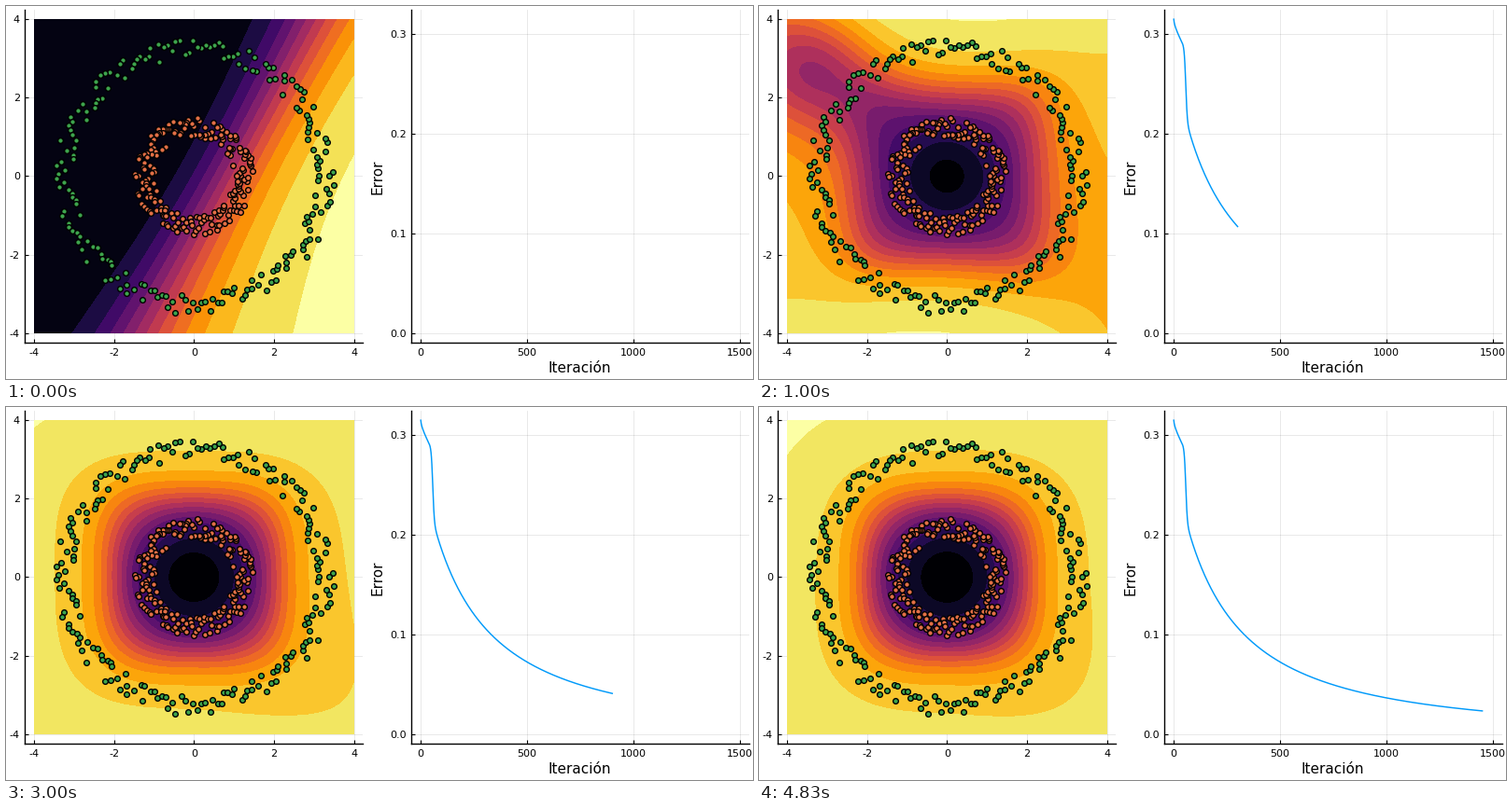
Recreate the animation shown at these times as a matplotlib script. Size 800 by 400 pixels, loop 4.99 s.

```python
import numpy as np
import matplotlib
import matplotlib.pyplot as plt
from matplotlib.animation import FuncAnimation

W, H, DPI = 800, 400, 100
STEPS, TICKS, LOOP_MS = 30, 5, 4990     # each step is held for five ticks
ITERATIONS = 50                         # training iterations per step
BLUE, ORANGE, GREEN = "#009afa", "#e26f46", "#3da44d"

plt.rcParams.update({
    "font.family": "DejaVu Sans",
    "axes.unicode_minus": False,
    "axes.linewidth": 1.0,
})
inferno = matplotlib.colormaps["inferno"]
X, Y = np.meshgrid(np.linspace(-4, 4, 172), np.linspace(-4, 4, 169))


def sigmoid(v):
    return 1 / (1 + np.exp(-v))


def smooth(t):
    t = np.clip(t, 0, 1)
    return t * t * (3 - 2 * t)


def bump(x0, y0, sx, sy):
    return np.exp(-((X - x0) / sx) ** 2 / 2 - ((Y - y0) / sy) ** 2 / 2)


# --- network output on the plane, from 0 to 1 ----------------------------

def ramp():
    """Untrained network: a slanted, slightly bent slope."""
    width = 1.04 - 0.021 * Y - 0.18 * np.cos(np.pi * Y / 8)
    p = (X - 0.95 - 0.53 * Y) / width
    return sigmoid(1.2 * p - 0.15 - 0.12 * p * p)


def hills():
    """First dip in the middle, uneven hills at the borders."""
    rank = (6 - 5.9 * bump(0.5, -0.15, 1.3, 1.12)
            + 6.5 * bump(4.2, 2.7, 1.2, 2.0)
            + 6.0 * bump(0.9, -4.5, 1.5, 1.2)
            + 2.6 * bump(-4.2, 1.0, 0.9, 1.1)
            - 3.0 * bump(-4.3, -2.6, 0.9, 1.3)
            - 1.3 * bump(-4.0, 3.8, 0.8, 0.8)
            + 1.8 * bump(0.8, 4.5, 2.0, 1.0)
            + 1.5 * bump(4.0, -2.0, 1.2, 1.5))
    return rank / 15


def bowl(step):
    """Rounded-square bowl that gets steeper and rounder with training."""
    rest = np.exp(-(step - 6) / 7)
    done = 1 - rest
    n = 2 + (1.1 + 1.5 * rest) * smooth((np.hypot(X, Y) - 0.9) / 2.2)
    rho = (np.abs(X) ** n + np.abs(Y) ** n) ** (1 / n)

    u = rho - (1.9 + 0.18 * rest)
    slope = 1.65 + 0.55 * done
    logit = np.where(u < 0, slope * u,
                     1.9 * np.tanh(slope * u / 1.9) + 0.08 * u * u)

    xy = X * Y / 16
    logit += rest * (0.65 * (Y * Y - X * X) / 16 + 0.4 * xy - 0.5 * xy * xy)
    logit += 0.45 * done * (Y - X) / 8 * (X * X + Y * Y) / 32
    logit -= 1.6 * rest ** 2 * bump(-3.4, 2.8, 1.2, 1.2)
    return sigmoid(logit)


def surface(step):
    if step <= 2:
        return ramp() + (hills() - ramp()) * step / 2
    if step < 6:
        return hills() + (bowl(6) - hills()) * (step - 2) / 4
    return bowl(step)


def error_at(t):
    """Short plateau that collapses near t = 56, then a slow decay."""
    decay = 1 / (3.69 + 0.01674 * t + 6.97e-6 * t * t)
    plateau = (0.041 + 0.00055 * t) * sigmoid((56 - t) / 3.5)
    return decay + plateau + 0.003 * np.exp(-t / 2)


# --- stage ---------------------------------------------------------------

fig = plt.figure(figsize=(W / DPI, H / DPI), dpi=DPI, facecolor="white")


def panel(x0, x1, xa, xb, ya, yb, xticks, yticks):
    """Axes from pixel x0 to x1; xa, xb, ya, yb are (pixel, value) pairs."""
    top, bottom = 4, 361
    ax = fig.add_axes([x0 / W, 1 - bottom / H, (x1 - x0) / W, (bottom - top) / H])

    def value(p, a, b):
        return a[1] + (p - a[0]) * (b[1] - a[1]) / (b[0] - a[0])

    ax.set_xlim(value(x0, xa, xb), value(x1, xa, xb))
    ax.set_ylim(value(bottom, ya, yb), value(top, ya, yb))
    ax.set_xticks(xticks)
    ax.set_yticks(yticks)
    ax.tick_params(direction="in", length=3, width=0.8, labelsize=8)
    ax.tick_params(axis="x", pad=4)
    ax.tick_params(axis="y", pad=3.7)
    ax.spines[["top", "right"]].set_visible(False)
    ax.set_axisbelow(True)
    ax.grid(color="black", alpha=0.1, linewidth=0.6)
    return ax


left = panel(20, 382, (30, -4), (372.6, 4), (351, -4), (14, 4),
             range(-4, 5, 2), range(-4, 5, 2))
right = panel(434, 796, (444.2, 0), (786, 1500), (351, 0), (30.2, 0.3),
              range(0, 1501, 500), [0, 0.1, 0.2, 0.3])
fig.text(614.5 / W, 1 - 393 / H, "Iteración", size=11, ha="center", va="baseline")
fig.text(398 / W, 1 - 183 / H, "Error", size=11, rotation=90,
         ha="center", va="center")

rng = np.random.default_rng(12)
angle = np.linspace(0, 2 * np.pi, 200)
for radius, color in ((3, GREEN), (1, ORANGE)):
    r = radius + rng.uniform(0, 0.5, angle.size)
    left.plot(r * np.cos(angle), r * np.sin(angle), "o", ms=4.1,
              mfc=color, mec="black", mew=1.0, zorder=3)
curve, = right.plot([], [], color=BLUE, lw=1.05, zorder=3)
fills = []


def show(step):
    while fills:
        fills.pop().remove()
    bands, dark = (16, 0) if step else (13, 0.035)
    fills.append(left.contourf(
        X, Y, np.clip(surface(step) * bands, 0.001, bands - 0.001),
        levels=np.arange(bands + 1), zorder=1,
        colors=inferno(np.linspace(dark, 1, bands))))
    t = np.arange(ITERATIONS * step + 1 if step else 0)
    curve.set_data(t, error_at(t))


def update(tick):
    # a step begins one tick early, so rounded clock times still fall inside it
    show(min((tick + 1) // TICKS, STEPS - 1))
    return [curve]


anim = FuncAnimation(fig, update, frames=STEPS * TICKS,
                     interval=LOOP_MS / (STEPS * TICKS),
                     repeat=True, repeat_delay=0, blit=False)
plt.show()
```
